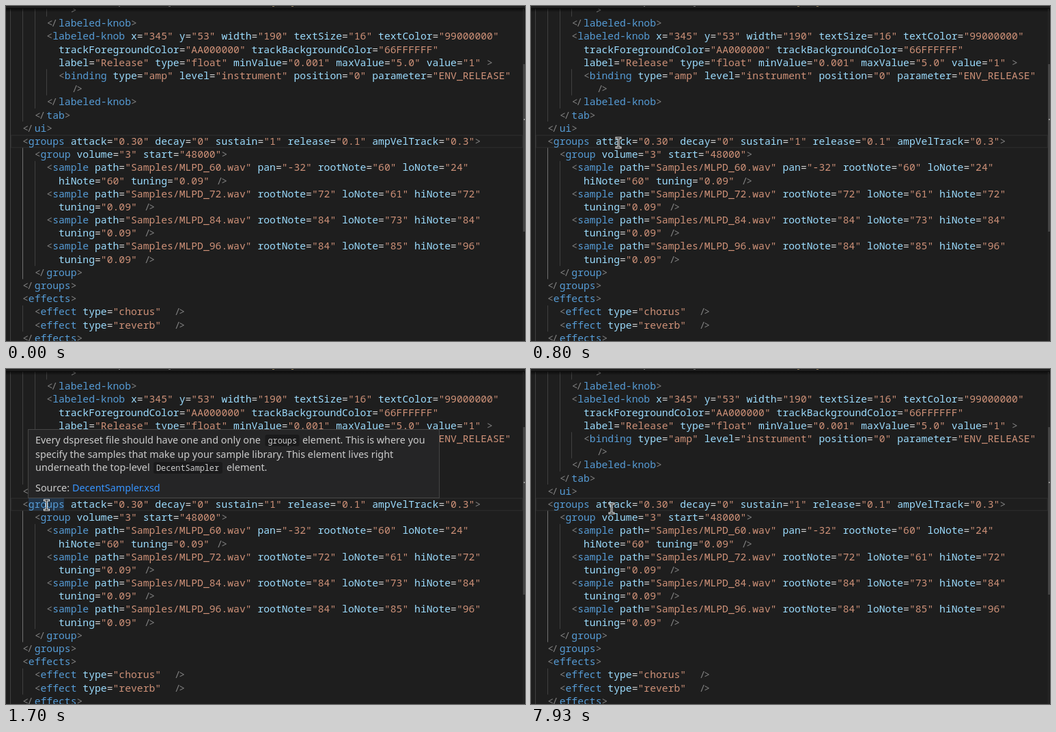
An HTML page with a canvas that plays this animation: 760 px wide and 490 px high, repeating every 8 s.

```html
<!DOCTYPE html>
<html lang="en">
<head>
<meta charset="utf-8">
<style>
  html, body { margin: 0; width: 760px; height: 490px; overflow: hidden; background: #1e1e1e; }
  canvas { display: block; }
</style>
</head>
<body>
<canvas id="stage" width="760" height="490"></canvas>
<script>
const ctx = document.getElementById('stage').getContext('2d');
const LOOP = 8000, FPS = 30;
const LEFT = 24, COL = 8.832, ROW = 19.2, MID = 5.9;
const CODE = '14.72px "Noto Sans Mono", monospace';
const PROSE = '14.4px "Noto Sans", sans-serif';
const INLINE = '11.8px "Noto Sans Mono", monospace';
const COLOR = { punct: '#808080', tag: '#569cd6', attr: '#9cdcfe', string: '#ce9178', equals: '#d4d4d4' };

const source = [
  '        >',
  '    </labeled-knob>',
  '    <labeled-knob x="345" y="53" width="190" textSize="16" textColor="99000000"',
  '      trackForegroundColor="AA000000" trackBackgroundColor="66FFFFFF"',
  '      label="Release" type="float" minValue="0.001" maxValue="5.0" value="1" >',
  '      <binding type="amp" level="instrument" position="0" parameter="ENV_RELEASE"',
  '        />',
  '    </labeled-knob>',
  '  </tab>',
  '</ui>',
  '<groups attack="0.30" decay="0" sustain="1" release="0.1" ampVelTrack="0.3">',
  '  <group volume="3" start="48000">',
  '    <sample path="Samples/MLPD_60.wav" pan="-32" rootNote="60" loNote="24"',
  '      hiNote="60" tuning="0.09" />',
  '    <sample path="Samples/MLPD_72.wav" rootNote="72" loNote="61" hiNote="72"',
  '      tuning="0.09" />',
  '    <sample path="Samples/MLPD_84.wav" rootNote="84" loNote="73" hiNote="84"',
  '      tuning="0.09" />',
  '    <sample path="Samples/MLPD_96.wav" rootNote="84" loNote="85" hiNote="96"',
  '      tuning="0.09" />',
  '  </group>',
  '</groups>',
  '<effects>',
  '  <effect type="chorus"  />',
  '  <effect type="reverb"  />',
  '</effects>'
];

// Indent guides: column, first row, row after the last
const guides = [
  [-2, 0, 26], [0, 0, 9], [0, 22.5 + .5, 25], [2, 0, 8],
  [2, 12, 20], [4, 0, 1], [4, 5, 7]
];

// Pointer tracks: [tick, x, y]; each rests on its last point
const tracks = [
  [[7, 754, 6], [12, 440, 34], [19, 200.5, 116], [24, 128, 200]],
  [[39, 57.5, 202]],
  [[47, 57.5, 202], [49, 77, 200], [51, 59.5, 199]],
  [[226, 59.5, 199], [227, 62.5, 207], [229, 73.5, 238], [232, 94, 274], [235, 112, 243], [238, 118, 204]]
];

function rect(color, x, y, w, h) {
  ctx.fillStyle = color;
  ctx.fillRect(x, y, w, h);
}

function text(str, x, y, color, font) {
  ctx.font = font;
  ctx.fillStyle = color;
  ctx.fillText(str, x, y);
}

function drawLine(line, row) {
  const y = Math.round(MID + row * ROW + 5);
  const put = (str, col, color, shift = 0) => text(str, LEFT + col * COL + shift, y, color, CODE);
  let inName = false;
  for (const m of line.matchAll(/<\/|\/>|[<>=]|"[^"]*"|[\w-]+/g)) {
    const [tok] = m, col = m.index;
    if (tok === '</') {
      put('<', col, COLOR.punct, .3);
      put('/', col + 1, COLOR.punct, -2);
    } else if (tok === '/>') {
      put('/', col, COLOR.punct, 2);
      put('>', col + 1, COLOR.punct, -.3);
    } else if (tok === '<' || tok === '>') {
      put(tok, col, COLOR.punct);
    } else if (tok === '=') {
      put(tok, col, COLOR.equals);
    } else if (tok[0] === '"') {
      put(tok, col, COLOR.string);
    } else {
      put(tok, col, inName ? COLOR.tag : COLOR.attr);
    }
    inName = tok[0] === '<';
  }
}

function drawEditor(hovered) {
  rect('#1e1e1e', 0, 0, 760, 490);
  ctx.strokeStyle = '#2a2a2a';
  ctx.lineWidth = 1.5;
  ctx.strokeRect(7.5, 189.2, 749, 17.8);
  if (hovered) rect('rgba(38,79,120,.45)', 33, 189, 52, 18);

  const top = row => Math.max(0, MID + (row - .5) * ROW);
  const guide = (col, a, b, color) =>
    rect(color, Math.round(LEFT + col * COL), top(a), 1, top(b) - top(a));
  for (const [col, a, b] of guides) guide(col, a, b, '#404040');
  guide(0, 11, 21, '#707070');

  source.forEach(drawLine);

  rect('#1e1e1e', 0, 0, 760, 4);
  const shade = ctx.createLinearGradient(0, 3, 0, 9);
  shade.addColorStop(0, 'rgba(0,0,0,.65)');
  shade.addColorStop(1, 'rgba(0,0,0,0)');
  rect(shade, 0, 3, 760, 6);
  rect('#666', 165, 0, 2, 1);
  rect('#666', 238, 0, 3, 1);
  rect('#8a7650', 390, 0, 3, 1);
  rect('#8a7650', 418, 0, 3, 1);

  rect('#2a2a2a', 757, 4, 1, 486);
  rect('#434343', 757, 85, 3, 245);
  rect('#909090', 758, 165, 2, 2);
}

function inlineCode(str, x, y, w) {
  ctx.fillStyle = 'rgba(10,10,10,.4)';
  ctx.beginPath();
  ctx.roundRect(x, y - 13, w, 17, 3);
  ctx.fill();
  text(str, x + 4, y - .5, '#cccccc', INLINE);
}

function drawTooltip(alpha) {
  ctx.globalAlpha = alpha;
  rect('#252526', 32, 88, 603, 101);
  ctx.strokeStyle = '#454545';
  ctx.lineWidth = 1;
  ctx.strokeRect(32.5, 88.5, 602, 100);
  const prose = (str, x, y, color = '#cccccc') => text(str, x, y, color, PROSE);
  prose('Every dspreset file should have one and only one', 43, 109);
  inlineCode('groups', 379.5, 109, 50);
  prose('element. This is where you', 434, 109);
  prose('specify the samples that make up your sample library. This element lives right', 43, 130);
  prose('underneath the top-level', 43, 149);
  inlineCode('DecentSampler', 216, 149, 101);
  prose('element.', 323, 149);
  prose('Source:', 43, 179);
  prose('DecentSampler.xsd', 97, 179, '#3794ff');
  ctx.globalAlpha = 1;
}

function along(keys, tick) {
  const last = keys.length - 1;
  if (tick >= keys[last][0]) return keys[last].slice(1);
  const i = keys.findIndex((k, j) => j < last && tick < keys[j + 1][0]);
  const at = j => keys[Math.min(last, Math.max(0, j))];
  const a = at(i), b = at(i + 1), span = b[0] - a[0], u = (tick - a[0]) / span;
  const slope = (j, c) => (at(j + 1)[c] - at(j - 1)[c]) / (at(j + 1)[0] - at(j - 1)[0]) * span;
  return [1, 2].map(c =>
    a[c] * (1 + 2 * u) * (1 - u) ** 2 + b[c] * u * u * (3 - 2 * u) +
    slope(i, c) * u * (1 - u) ** 2 - slope(i + 1, c) * u * u * (1 - u));
}

function drawPointer(tick) {
  const keys = tracks.filter(k => k[0][0] <= tick).pop();
  if (!keys) return;
  const [x, y] = along(keys, tick);
  ctx.beginPath();
  for (const d of [-1, 1]) {
    ctx.moveTo(x - 3, y + 7 * d);
    ctx.lineTo(x + 3, y + 7 * d);
  }
  ctx.moveTo(x, y - 7);
  ctx.lineTo(x, y + 7);
  ctx.lineCap = 'square';
  for (const [color, width] of [['#f4f4f4', 3], ['#151515', 1]]) {
    ctx.strokeStyle = color;
    ctx.lineWidth = width;
    ctx.stroke();
  }
}

function draw(tick) {
  const hovered = tick >= 39 && tick < 228;
  drawEditor(hovered);
  if (hovered) drawTooltip(Math.min(1, .65 + (tick - 39) * .2));
  drawPointer(tick);
}

const start = performance.now();
let shown = -1;
function loop() {
  const t = (performance.now() - start) % LOOP;
  const tick = Math.floor((t + 5) * FPS / 1000);
  if (tick !== shown) draw(shown = tick);
  requestAnimationFrame(loop);
}
loop();
</script>
</body>
</html>
```
